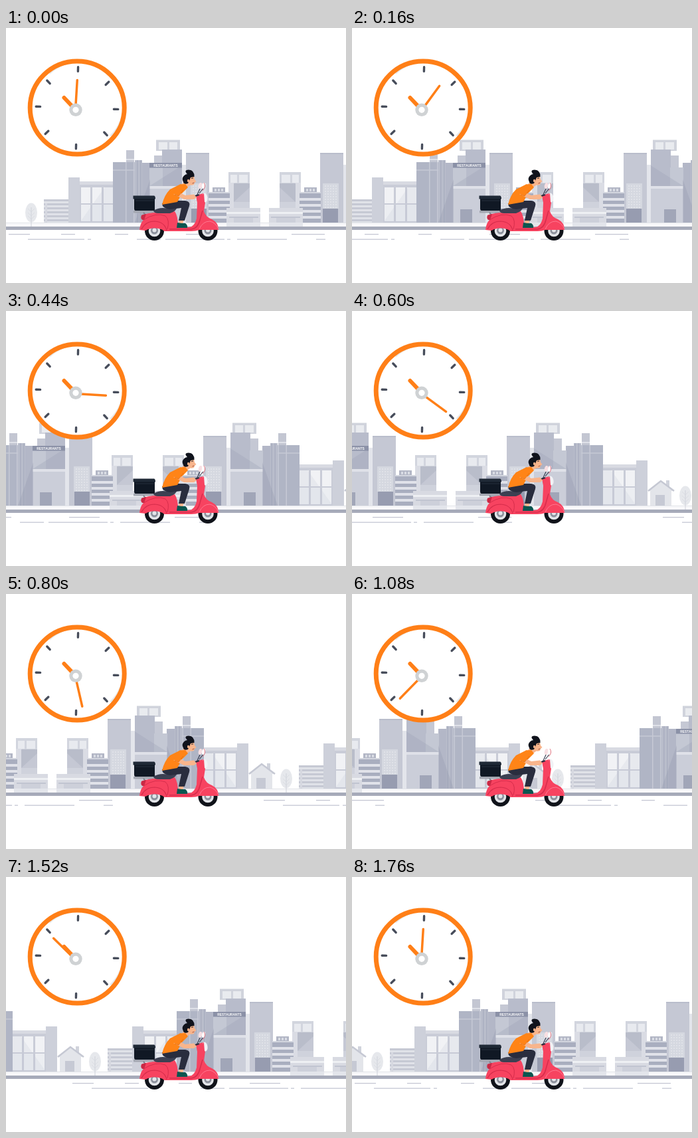
Animation of 512 by 384 pixels, one loop 1800 ms. Source, as an HTML page with a canvas:

```html
<!DOCTYPE html>
<html lang="en">
<head>
<meta charset="utf-8">
<title>Delivery ride</title>
<style>
html, body { margin: 0; width: 100%; height: 100%; overflow: hidden; background: #fff; }
canvas { display: block; }
</style>
</head>
<body>
<canvas id="stage" width="512" height="384"></canvas>
<script>
const g = document.getElementById('stage').getContext('2d');
const STEP = 40, STEPS = 45, SPAN = 704, SPEED = 16, MIRROR = 779;

function rect(x, y, right, bottom, color) {
  g.fillStyle = color;
  g.fillRect(x, y, right - x, bottom - y);
}
function shape(d, fill, stroke, width = 1) {
  const path = new Path2D(d);
  if (fill) { g.fillStyle = fill; g.fill(path); }
  if (stroke) { g.strokeStyle = stroke; g.lineWidth = width; g.stroke(path); }
}
function disc(x, y, rx, color, ry = rx, turn = 0) {
  g.fillStyle = color;
  g.beginPath();
  g.ellipse(x, y, rx, ry, turn, 0, 7);
  g.fill();
}
function line(x1, y1, x2, y2, color, width) {
  shape(`M${x1} ${y1}L${x2} ${y2}`, null, color, width);
}
function rows(x, y, right, bottom, gap, size, color) {
  for (; y < bottom; y += gap) rect(x, y, right, y + size, color);
}
function cols(x, y, right, bottom, gap, size, color) {
  for (; x < right; x += gap) rect(x, y, x + size, bottom, color);
}

// One side of the street; the other side is its reflection.
function block() {
  // glazed hall
  rect(111, 231, 165, 293, '#c9ccd7');
  rect(111, 231, 165, 236, '#d8dae2');
  for (const x of [113, 130, 147]) {
    rect(x, 240, x + 14, 264, '#f1f2f5');
    rect(x, 266, x + 14, 291, '#eceef2');
  }
  shape('M111 293L150 238H165V293Z', 'rgba(190,194,208,.2)');
  rect(94, 225, 111, 293, '#cdd0da');

  // striped towers
  rect(181, 184, 193, 203, '#c3c6d2');
  rect(181, 197, 193, 199, '#dfe1e8');
  rect(161, 202, 194, 293, '#b0b5c5');
  rect(161, 213, 194, 215, '#c0c4d1');
  cols(180, 202, 193, 293, 12, 1.5, '#c6c9d5');
  rect(194, 199, 205, 293, '#b9bdcb');
  cols(197, 199, 204, 293, 5, 1.5, '#a9aec0');
  rect(205, 203, 217, 293, '#b3b7c7');

  // central tower
  rect(226, 168.5, 262, 185, '#d0d3dc');
  rect(230, 172, 243, 183, '#e9ebef');
  rect(246, 172, 258, 183, '#e9ebef');
  rect(223, 192, 240, 238, '#c5c8d4');
  rect(235, 183, 265, 238, '#b8bccb');
  rect(216, 210, 236, 238, '#c4c8d4');
  shape('M216 238L265 207V238Z', 'rgba(154,160,180,.3)');
  rect(216, 238, 265, 293, '#cbced9');
  rect(216, 238, 265, 242, '#dfe1e8');
  rect(227, 273, 245, 293, '#a1a6b8');
  shape('M194 293L217 228V293Z', 'rgba(150,156,176,.35)');
  rect(265, 206, 271, 293, '#e3e5eb');

  // tall slab with a door
  rect(271, 188, 306, 293, '#c5c8d4');
  rect(271, 188, 306, 190, '#b9bdcb');
  rect(278, 234, 302, 272, '#d5d8e0');
  for (let y = 237; y < 270; y += 4) cols(281, y, 300, y + 2, 4, 2, '#e0e2e8');
  rect(279, 272, 302, 293, '#979cb0');

  // outlined tower
  rect(335, 217, 367, 272, '#d2d5de');
  rect(338, 221, 348, 233, '#e8eaef');
  rect(351, 221, 364, 233, '#e8eaef');
  rect(335, 233, 344, 272, '#dadce4');
  rect(343, 234, 367, 262, '#b9bdca');
  shape('M343 262L367 240V262Z', '#c5c8d4');
  rect(343, 262, 367, 272, '#cfd2dc');

  // banded office
  rect(311, 240, 330, 248, '#b2b6c5');
  cols(314, 242, 329, 246, 5, 3, '#d9dce4');
  rect(305, 247, 337, 293, '#a9aebf');
  rect(305, 247, 337, 249, '#d3d6df');
  rows(305, 256, 337, 291, 9, 4, '#e0e2e9');

  // low terrace
  rect(332, 271, 383, 293, '#d8dae2');
  rect(332, 277, 383, 280, '#eef0f3');
  rect(336, 284, 380, 286, '#c1c5d1');
  rect(343, 286, 372, 293, '#cdd0da');
  rect(332, 293, 383, 299, '#e3e5eb');
}

function tree(x) {
  disc(x, 278, 9, '#e6e8ec', 14.5);
  line(x, 270, x, 299, '#cfd2da', 1);
  for (const y of [277, 283, 288]) shape(`M${x - 5} ${y - 5}L${x} ${y}L${x + 5} ${y - 5}`, null, '#d5d7de', .7);
}

function house() {
  rect(713, 255, 718, 266, '#d0d3dc');
  rect(689, 268, 721, 293, '#e3e5ea');
  shape('M686 271L705 256L725 271', '#e3e5ea', '#c5c8d3', 2.5);
  rect(697, 277, 711, 293, '#c6c9d4');
}

function street() {
  tree(38);
  rect(57, 258, 94, 293, '#e0e2e8');
  rows(57, 258, 94, 293, 6, 3, '#c6c9d4');
  rect(59, 264, 62, 293, '#d6d8e0');
  block();
  g.save();
  g.translate(MIRROR, 0);
  g.scale(-1, 1);
  block();
  g.restore();
  house();

  rect(216, 203, 265, 210.5, '#8b91a7');
  g.fillStyle = '#fff';
  g.font = 'bold 4.9px "Liberation Sans", Arial, sans-serif';
  g.textAlign = 'center';
  g.fillText('RESTAURANTS', 240.5, 208.6);

  const dash = (y, ...ends) => {
    for (let i = 0; i < ends.length; i += 2) rect(ends[i], y, ends[i + 1], y + 1.3, '#c5c8d4');
  };
  dash(310, 4, 36, 83, 104, 164, 184, 271, 317, 430, 480);
  dash(317.6, 33, 118, 123, 128, 197, 233, 240, 329, 333, 338, 348, 423, 467, 481);
}

function clock(angle) {
  const cx = 105, cy = 123.3;
  disc(107.2, 120, 71, '#fff', 70);
  g.lineCap = 'butt';
  shape('M65 68A67 66 0 0 1 158 163', null, '#e8e9ea', 4);
  g.lineWidth = 7;
  g.strokeStyle = '#ff7f17';
  g.beginPath();
  g.ellipse(107.2, 120, 71, 70, 0, 0, 7);
  g.stroke();

  // Each mark has a partner straight across the dial.
  g.lineCap = 'round';
  const marks = [[1.5, -58.3], [45.5, -37], [58.6, 2], [43, 39]];
  marks.forEach(([x, y], i) => {
    const a = i * Math.PI / 4 - Math.PI / 2 + .03;
    const dx = 3.2 * Math.cos(a), dy = 3.2 * Math.sin(a);
    for (const side of [1, -1]) {
      const mx = 107 + side * x, my = 120.3 + side * y;
      line(mx - dx, my - dy, mx + dx, my + dy, '#474d5b', 3.4);
    }
  });
  line(cx - 3, cy - 3, 87.5, 105, '#ff7f17', 6);
  const px = 104.5, py = 124.4;
  line(px, py, px + 46 * Math.sin(angle), py - 46 * Math.cos(angle), '#ff7f17', 3.5);
  g.lineCap = 'butt';
  disc(cx, cy, 9.7, '#cfd2d4');
  disc(cx, cy, 4.6, '#fff');
}

function wheel(x) {
  disc(x, 305.5, 14.5, '#10131a');
  disc(x, 305.5, 8.8, '#e3e5e9');
  disc(x, 305, 5.5, '#8b909c');
  disc(x, 304.5, 3, '#e3e5e9');
}

function scooter() {
  const red = '#f74360', deep = '#d72d4c', navy = '#292d3e', skin = '#f8b58c', orange = '#ff8417';
  wheel(223.5);
  wheel(304);

  // rack and box
  rect(192, 275, 229, 278.5, '#a3a7b1');
  line(207, 278, 212, 284, '#80848f', 2);
  shape('M193 257H224V275H195Q193 275 193 272Z', '#101824');
  shape('M191.5 252.5H223Q225 253 225 257.5H191.5Z', '#1f2936');
  line(195, 260, 223, 260, '#2b3544', .8);

  // body
  shape('M204 282Q220 276 240 279L254 276Q259 283 259 298L264 300H276Q284 299 287 287L288 263L286 252L297 249L300 263L298 276Q301 285 310 288Q320 293 320 304H291Q286 306 279 306H241Q237 306 236 304Q223 298 210 305L201 304Q202 294 207 289Q202 289 204 282Z', red);
  shape('M207 289Q226 277 240 283Q247 289 243 303', null, deep, 1);
  shape('M204 303Q210 291 224 291Q239 292 242 305', null, deep, 1.2);
  shape('M246 303H279Q289 302 292 289L296 275', null, deep, 1.5);
  shape('M291 303Q296 291 307 291Q316 293 320 303', null, '#ff7890', 1);
  shape('M204 282L211 280L208 289Q202 290 204 282Z', '#c92945');

  // head, lamp and mirrors
  disc(299.5, 255.5, 4, '#f1f2f5', 7, -.15);
  shape('M286 251L293 254L298 249L299 262L289 265Z', red);
  line(287, 253, 293, 240, '#30384c', 1.1);
  line(291, 249, 299, 239, '#30384c', 1.1);
  disc(292.5, 237.5, 2.6, '#f8dfe2', 4.6, .25);
  disc(297.5, 237.5, 2.4, '#fff', 4.6, .2);
  shape('M298 233Q302 239 296 245', null, '#e06a78', .9);
  line(279, 255, 291, 251, navy, 2.2);

  // seat
  shape('M222 275Q232 269 244 272L258 268Q257 276 247 279H229Q223 279 222 275Z', '#3c4052');

  // leg and shoe
  shape('M261 287L268 288L266 295H260Z', skin);
  shape('M235 264L255 260H270Q278 261 276 268L269 290L260 290L264 271L247 273Q235 272 235 264Z', navy);
  shape('M258 293L264 294L270 294Q274 297 273 301H257Z', '#0b5650');

  // neck, shirt and arm
  shape('M269 230L277 229V237L271 241L264 237Z', skin);
  shape('M262 235.5L270 235L274 240L265 249L258 262L235 266Q238 252 247 243Z', orange);
  shape('M252 250L260 247L270 252L283 250.5L287 255L283 258L268 258Z', skin);
  shape('M262 235.5Q269 235 268 242L260 253L251 249Z', orange);
  shape('M254 251L260 253L267 244', null, '#e66d0b', .8);

  // head
  shape('M272 224L283 223L284 228L286.5 231L284 233L283 236Q278 238 273 235Z', skin);
  shape('M267 232Q264 226 268 222.5Q270 220 273 220Q267 214 275 213.5Q284 214 283.5 224L278 225L276 230L274 234Q268 236 267 232Z', '#10131c');
  disc(274.5, 230, 1.5, skin, 2.2);
  line(279, 226.5, 282, 226, '#10131c', .8);
  line(280.5, 234, 283.5, 233, '#8c3b31', .8);
}

function draw(now) {
  const n = Math.floor(now / STEP) % STEPS;
  rect(0, 0, 512, 384, '#fff');
  rect(0, 293, 512, 294, '#e1e3e8');
  rect(0, 294, 512, 299, '#f8f8fa');
  rect(0, 299, 512, 304, '#a6aab9');
  for (const start of [0, SPAN]) {
    g.save();
    g.translate(start - n * SPEED, 0);
    street();
    g.restore();
  }
  clock(.06 + n / (STEPS - 1) * 2 * Math.PI);
  scooter();
}

function tick() {
  draw(performance.now());
  requestAnimationFrame(tick);
}
tick();
</script>
</body>
</html>
```
